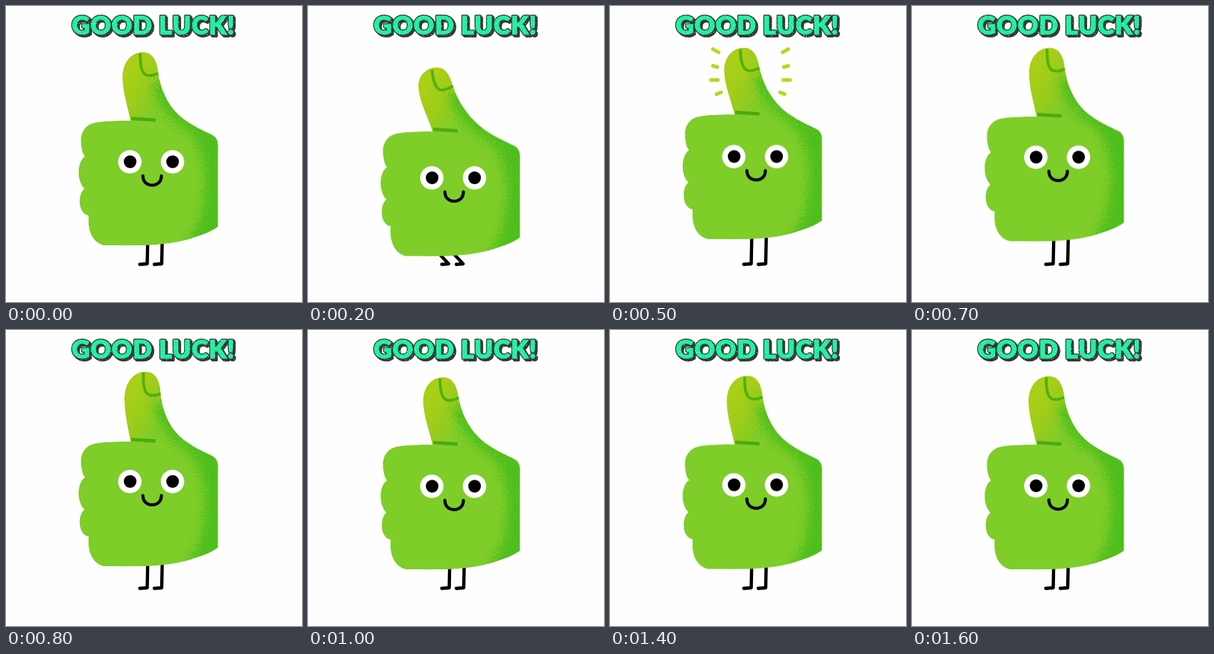
These frames come from a looping animation (480 px wide and 480 px high, 1.7 s). An HTML page without scripts:

```html
<!DOCTYPE html>
<html lang="en">
<head>
<meta charset="utf-8">
<title>Good luck</title>
<style>
  html, body { margin: 0; width: 100%; height: 100%; overflow: hidden; background: #fefefe; }
  svg { display: block; width: 100vw; height: 100vh; }

  /* 0 = thumb bent back, 1 = thumb fully forward; one held value per 100 ms */
  :root {
    --bend: linear(
      .76 0% 5.882%, .38 5.882% 11.764%, 0 11.764% 17.647%, .16 17.647% 23.529%,
      .32 23.529% 29.411%, .47 29.411% 35.294%, .65 35.294% 41.176%, .82 41.176% 47.058%,
      1 47.058% 52.941%, .8 52.941% 58.823%, .59 58.823% 64.705%, .74 64.705% 70.588%,
      .88 70.588% 76.47%, .83 76.47% 82.352%, .79 82.352% 88.235%, .77 88.235% 94.117%,
      .76 94.117% 100%);
  }
  .thumb, .nail, .web { animation: 1.7s var(--bend) infinite; }
  .thumb { animation-name: thumb; }
  .nail { animation-name: nail; fill: none; stroke: #52af10; stroke-width: 4.5; }
  .web { animation-name: web; fill: none; stroke: #4fbe1d; stroke-width: 24; }
  .palm {
    d: path("M204 186 C180 186 150 186 138 191 C122 198 120 214 122 226 C123 236 125 240 128 244 C115 252 114 284 127 296 C115 307 117 337 134 340 C132 364 139 382 158 388 C220 389 262 389 300 377 C318 371 330 367 343.5 358 L343.5 224 L330 225 L262 192 L250 187 Z");
  }

  @keyframes thumb {
    from { d: path("M202 187 C197 167 179 137 179 112 C179 95 192 82 209 82 C223 82 230 94 235 112 C243 136 255 155 275 174 C295 192 322 203 334 209 Q343.5 214 343.5 224 L343.5 240 L240 240 Z"); }
    to { d: path("M202 187 C198 165 192 140 192 117 C192 90 207 72.5 226 72.5 C243 72.5 250 88 251 108 C253 133 262 158 281 177 C300 194 322 203 334 209 Q343.5 214 343.5 224 L343.5 240 L240 240 Z"); }
  }
  @keyframes nail {
    from { d: path("M201 86 C203 106 208 121 220 118.5 C226 117 231 115 235 112"); }
    to { d: path("M223 74 C222 96 224 111 237 111 C243 111 247 110 250.5 108"); }
  }
  @keyframes web {
    from { d: path("M239 124 C245 140 255 155 275 174 C295 192 322 203 346 215 L346 362"); }
    to { d: path("M253 122 C255 138 263 158 281 177 C300 194 322 203 346 215 L346 362"); }
  }

  .body { animation: lift 1.7s infinite; }
  .face { animation: face 1.7s infinite; }
  @keyframes lift {
    0% { transform: none; animation-timing-function: steps(2); }
    11.764% { transform: translateY(17.5px); animation-timing-function: steps(2); }
    23.529% { transform: translateY(-7px); animation-timing-function: steps(1); }
    29.411% { transform: translateY(-10px); animation-timing-function: steps(3); }
    47.058% { transform: translateY(-5px); animation-timing-function: steps(2); }
    58.823% { transform: translateY(0); animation-timing-function: steps(2); }
    70.588% { transform: translateY(-1px); animation-timing-function: steps(4); }
    94.117%, 100% { transform: none; }
  }
  @keyframes face {
    0% { transform: none; animation-timing-function: steps(2); }
    11.764% { transform: translateY(26px); animation-timing-function: steps(2); }
    23.529% { transform: translateY(-5px); animation-timing-function: steps(1); }
    29.411% { transform: translateY(-8.5px); animation-timing-function: steps(3); }
    47.058% { transform: translateY(-7px); animation-timing-function: steps(2); }
    58.823% { transform: translateY(.7px); animation-timing-function: steps(2); }
    70.588% { transform: translateY(-3px); animation-timing-function: steps(4); }
    94.117%, 100% { transform: none; }
  }

  .leg {
    fill: none; stroke: #000; stroke-width: 5.3; stroke-linecap: round; stroke-linejoin: round;
    animation: leg 1.7s infinite;
  }
  @keyframes leg {
    0% { d: path("M230 370 L229 418 L217 419"); animation-timing-function: steps(2); }
    11.764% { d: path("M210 399 L228 418 L217 419"); animation-timing-function: steps(2); }
    23.529%, 100% { d: path("M230 370 L229 418 L217 419"); }
  }

  .sparks {
    fill: none; stroke: #bad71f; stroke-width: 6; stroke-linecap: round;
    transform-origin: 228px 110px; animation: sparks 1.7s steps(1) infinite;
  }
  @keyframes sparks {
    0% { opacity: 0; transform: scale(.94); }
    23.529% { opacity: 1; transform: scale(.94); }
    29.411% { opacity: 1; transform: none; }
    35.294% { opacity: 1; transform: scale(1.04); }
    41.176%, 100% { opacity: 0; transform: none; }
  }

  .title { font: 900 41px Lato, sans-serif; letter-spacing: .8px; text-anchor: middle; stroke-linejoin: round; }
</style>
</head>
<body>
<svg viewBox="0 0 480 480">
  <defs>
    <linearGradient id="skin" gradientUnits="userSpaceOnUse" x1="197" y1="115" x2="256" y2="150">
      <stop stop-color="#a9cf16"/>
      <stop offset=".45" stop-color="#9bcc1b"/>
      <stop offset="1" stop-color="#7ecd29"/>
    </linearGradient>
    <clipPath id="outline">
      <path class="thumb"/>
      <path class="palm"/>
    </clipPath>
    <filter id="spray" filterUnits="userSpaceOnUse" x="180" y="60" width="220" height="350" color-interpolation-filters="sRGB">
      <feGaussianBlur stdDeviation="6" result="soft"/>
      <feTurbulence type="fractalNoise" baseFrequency=".5" numOctaves="2" seed="4"/>
      <feDisplacementMap in="soft" scale="55" xChannelSelector="R" yChannelSelector="G"/>
    </filter>
    <filter id="glitter" filterUnits="userSpaceOnUse" x="100" y="8" width="282" height="50" color-interpolation-filters="sRGB">
      <feTurbulence type="fractalNoise" baseFrequency=".5" numOctaves="2">
        <animate attributeName="seed" from="0" to="17" dur="1.7s" repeatCount="indefinite"/>
      </feTurbulence>
      <feColorMatrix values="0 0 0 0 .88  0 0 0 0 1  0 0 0 0 .95  9 0 0 0 -6.1"/>
      <feComposite in2="SourceGraphic" operator="in" result="specks"/>
      <feMerge>
        <feMergeNode in="SourceGraphic"/>
        <feMergeNode in="specks"/>
      </feMerge>
    </filter>
    <g id="words">
      <text x="172" y="45.5">GOOD</text>
      <text x="309.5" y="45.5">LUCK!</text>
    </g>
    <path id="rays" d="M167 70L176 75M167 97L174 99M164 120H175M173 143L180 140"/>
  </defs>

  <rect width="480" height="480" fill="#fefefe"/>

  <path class="leg"/>
  <g transform="translate(23.5)"><path class="leg"/></g>

  <g class="body">
    <g clip-path="url(#outline)">
      <path class="thumb" fill="url(#skin)"/>
      <path class="palm" fill="#7ecd29"/>
      <g filter="url(#spray)">
        <path class="web"/>
        <path d="M294 194L352 212V372L290 394L316 345L324 280L315 232Z" fill="#4fbe1d"/>
      </g>
    </g>
    <path class="nail"/>
    <path d="M203 182.5L242.5 185" stroke="#4cab0e" stroke-width="5.3"/>
  </g>

  <g class="face">
    <g fill="#fff">
      <circle cx="200.8" cy="252.8" r="19"/>
      <circle cx="270" cy="252.8" r="19"/>
    </g>
    <circle cx="201.3" cy="252.6" r="10.3"/>
    <circle cx="270.2" cy="252.6" r="10.3"/>
    <path d="M222 275.5C222 285.5 229 290.5 237 290.5S252 285.5 252 275.5" fill="none" stroke="#000" stroke-width="5" stroke-linecap="round"/>
  </g>

  <g class="sparks">
    <use href="#rays"/>
    <use href="#rays" transform="translate(456) scale(-1 1)"/>
  </g>

  <g class="title" filter="url(#glitter)">
    <g fill="#383838" stroke="#383838" stroke-width="4">
      <use href="#words"/>
      <use href="#words" x="1.5" y="1.5"/>
      <use href="#words" x="3" y="3"/>
    </g>
    <use href="#words" fill="#1ff0a0" stroke="#1ff0a0"/>
  </g>
</svg>
</body>
</html>
```
